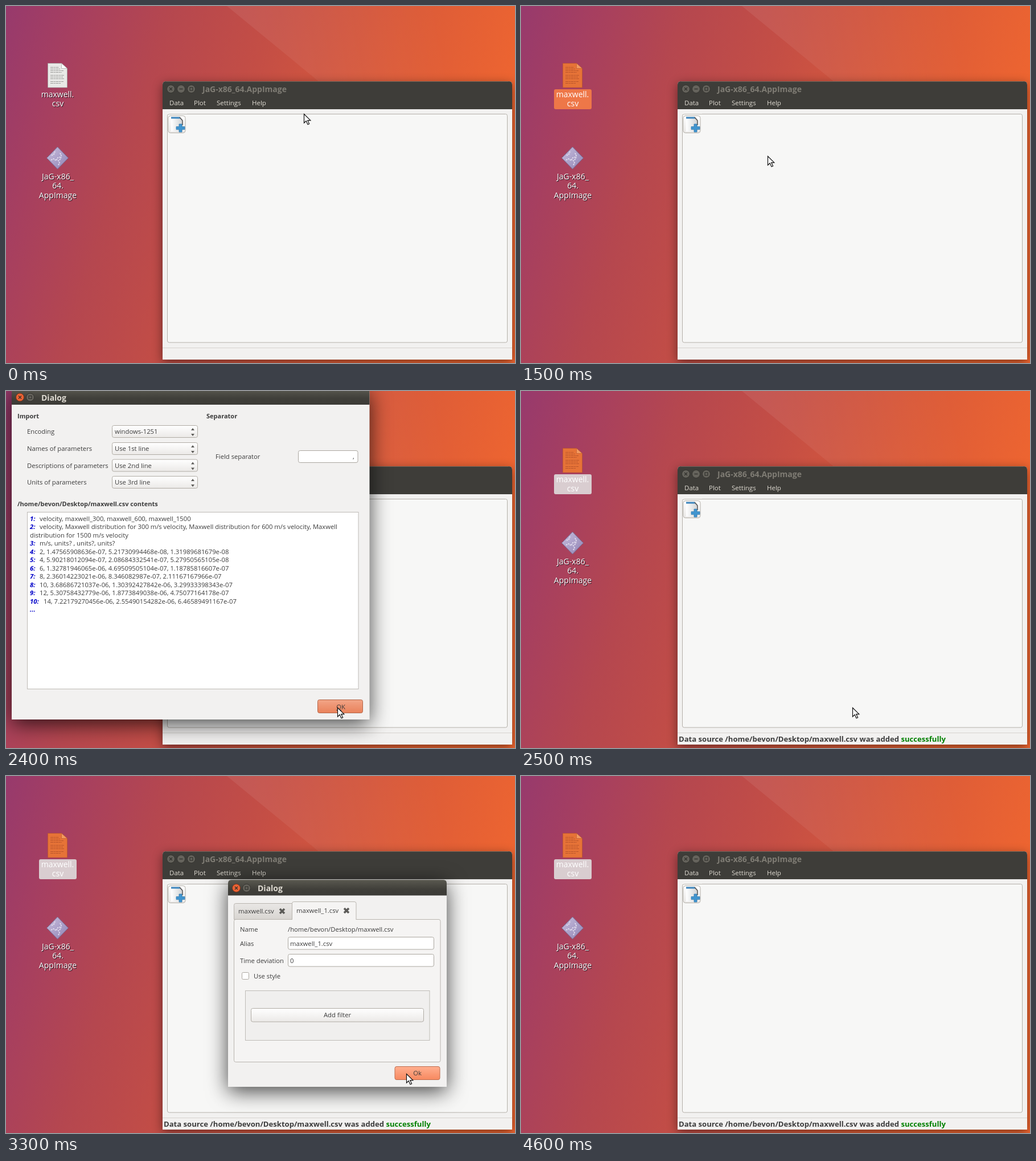
An HTML page for the animation above (4.8 s loop, 894 by 626 pixels).

```html
<!DOCTYPE html>
<html lang="en">
<head>
<meta charset="utf-8">
<title>Importing a CSV file</title>
<style>
html, body { margin: 0; width: 100%; height: 100%; overflow: hidden; }
svg { display: block; width: 894px; height: 626px; }
text { font: 11.25px "Open Sans", sans-serif; fill: #3c3c3c; white-space: pre; }
.bold { font-weight: 700; font-size: 11px; }
.title { font-weight: 700; font-size: 14px; fill: #dfdbd2; }
.menu { font-size: 11.5px; fill: #dfdbd2; }
.label { font-size: 14px; fill: #fff; text-anchor: middle; }
.shaded { filter: drop-shadow(1px 1px 0 #2a1420); }
.num { font-weight: 700; font-style: italic; fill: #0000c8; }
.status { font-weight: 700; font-size: 13.1px; }
.mid { text-anchor: middle; }
.field { fill: #fff; stroke: #aba7a0; }
.combo { fill: url(#button); stroke: #b0aca5; }
.frame { filter: drop-shadow(0 8px 18px #000b); }
#main .frame { filter: drop-shadow(0 5px 9px #0007); }
#main.active .frame { filter: drop-shadow(0 8px 18px #000b); }
#main:not(.active) .title { fill: #7f7c74; }
#main:not(.active) .bar { fill: #3e3d39; }
#main:not(.active) .close { fill: #65635c; stroke: #33322e; }
.ok rect { fill: url(#orange); stroke: #b9694b; }
.ok.hover rect { filter: brightness(1.03); }
.ok.down rect { filter: brightness(.97); }
.ok.down text { transform: translate(1px, 1px); }
.file { --page: #e9e9e7; --ink: #9a9a98; --fold: #fff; }
.file.hover { filter: brightness(1.12); }
.file.picked, #ghost { --page: #e67337; --ink: #b9542b; --fold: #f39a61; }
.plate { fill: none; }
.picked .plate, #ghost .plate { fill: #ee7748; }
.picked.dim .plate { fill: #d9cdd0; }
</style>
</head>
<body>
<svg id="stage" viewBox="0 0 894 626"></svg>
<script>
const text = (x, y, s, cls = '') => `<text x="${x}" y="${y}" class="${cls}">${s}</text>`;
const rect = (x, y, w, h, attrs = '') => `<rect x="${x}" y="${y}" width="${w}" height="${h}" ${attrs}/>`;
const path = (d, attrs = '') => `<path d="${d}" ${attrs}/>`;
const gradient = (id, line, ...stops) => `<linearGradient id="${id}" ${line}>` + stops.map(([at, color, alpha = 1]) =>
  `<stop offset="${at}" stop-color="${color}" stop-opacity="${alpha}"/>`).join('') + '</linearGradient>';
const down = 'x2="0" y2="1"';
const csvPath = '/home/bevon/Desktop/maxwell.csv';

// Dark rounded title bar, window buttons and light body
function windowFrame(x, y, w, h, barH, cy, titleX, title, hasMinimize) {
  const top = `M${x} ${y + barH}V${y + 6}q0 -6 6 -6H${x + w - 6}q6 0 6 6V${y + barH}z`;
  const cx = x + 14.5, mx = cx + (hasMinimize ? 36 : 18);
  const knob = (kx, cls) => `<circle cx="${kx}" cy="${cy}" r="7" fill="#65635c" stroke="#33322e" class="${cls}"/>`;
  return path(`M${x} ${y + 6}q0 -6 6 -6H${x + w - 6}q6 0 6 6V${y + h}H${x}z`, 'fill="#f2f1f0" class="frame"') +
    path(top, 'fill="url(#bar)" class="bar"') +
    path(`M${x + 6} ${y + .5}h${w - 12}`, 'stroke="#66645c"') +
    `<circle cx="${cx}" cy="${cy}" r="7" fill="#ec6334" stroke="#7d3119" class="close"/>` +
    path(`M${cx - 2.5} ${cy - 2.5}l5 5m0 -5l-5 5`, 'stroke="#33322e" stroke-width="1.4"') +
    (hasMinimize ? knob(cx + 18, '') + path(`M${cx + 15} ${cy}h6`, 'stroke="#33322e" stroke-width="1.4"') : '') +
    knob(mx, '') + rect(mx - 2.5, cy - 2.5, 5, 5, 'fill="none" stroke="#33322e" stroke-width="1.2"') +
    text(titleX, cy + 5.5, title, 'title');
}

const okButton = (id, x, y, w, s) => `<g id="${id}" class="ok">${rect(x + .5, y + .5, w, 23, 'rx="3"')}
  ${text(x + w / 2 + .5, y + 16, s, 'mid')}</g>`;

const combo = (y, label, value) => text(37, y + 15, label) +
  rect(186.5, y + .5, 150, 21, 'rx="3" class="combo"') + text(191, y + 15, value) +
  path(`M325 ${y + 9}l3 -4l3 4zM325 ${y + 15}l3 4l3 -4z`, 'fill="#5c5b58"');

const pageIcon = path('M73.5 100.5h24l10 9v33.5h-34z', 'fill="var(--page)" stroke="var(--ink)" stroke-width=".7"') +
  path('M97.5 100.5v9h10z', 'fill="var(--fold)" stroke="var(--ink)" stroke-width=".6"') +
  path('M78 107.5h15M78 110.5h17M78 113.5h23M78 116.5h20M78 121.5h24M78 124.5h22M78 127.5h24M78 132.5h23M78 135.5h18',
    'stroke="var(--ink)" stroke-dasharray="5 .7 3 .7"');
const fileLabel = rect(58, 146, 66, 35, 'rx="3" class="plate"') +
  text(90.5, 160, 'maxwell.', 'label') + text(91, 176, 'csv', 'label');

const wallpaper = rect(0, 0, 894, 626, 'fill="url(#sky)"') + path('M388 0H894V415z', 'fill="url(#facet)"');

const launcher = path('M90.5 247l19 19.5l-19 19.5l-19 -19.5z', 'fill="url(#lilac)" stroke="#75698f"') +
  path('M80 262l4 -2l2 -5M79 270l5 -2l4 3l3 -5l4 -1M92 279l2 -4l-2 -4l4 -3l1 -7l-3 -4',
    'fill="none" stroke="#e0daec" stroke-width="2" stroke-dasharray="2.5 1.2"') +
  `<g class="shaded">${text(91, 304, 'JaG-x86_', 'label')}${text(91, 320, '64.', 'label')}${text(91, 337, 'AppImage', 'label')}</g>`;

const mainWindow = windowFrame(275, 132, 614, 488, 49, 145.5, 345, 'JaG-x86_64.AppImage', true) +
  text(287, 173.5, 'Data', 'menu') + text(330, 173.5, 'Plot', 'menu') +
  text(370, 173.5, 'Settings', 'menu') + text(432, 173.5, 'Help', 'menu') +
  rect(283.5, 189.5, 597, 400.5, 'rx="3" fill="#f7f7f6" stroke="#b4b0a9"') +
  path('M284 188.5h34', 'stroke="#fff"') +
  rect(285, 192.5, 30, 30, 'rx="4" fill="url(#button)" stroke="#b4b0a9"') +
  path('M290 195h15l5 4v21h-20z', 'fill="url(#paper)"') + path('M290 194.5h15l2 3h-17z', 'fill="#3a83bb"') +
  path('M305 195l5 6v8', 'fill="none" stroke="#555" stroke-width="1.5"') +
  path('M304 207h5v4.500h5v5h-5v4.500h-5v-4.500h-5v-5h5z', 'fill="#4195cf" stroke="#2b74aa" stroke-width=".7"') +
  path('M275 599.5h614', 'stroke="#d6d3cf"') +
  `<g id="status"><text x="277" y="615" class="status">Data source ${csvPath} was added <tspan fill="#008000">successfully</tspan></text></g>`;

const csvLines = [
  'velocity, maxwell_300, maxwell_600, maxwell_1500',
  'velocity, Maxwell distribution for 300 m/s velocity, Maxwell distribution for 600 m/s velocity, Maxwell',
  'm/s, units? , units?, units?',
  '2, 1.47565908636e-07, 5.21730994468e-08, 1.31989681679e-08',
  '4, 5.90218012094e-07, 2.08684332541e-07, 5.27950565105e-08',
  '6, 1.32781946065e-06, 4.69509505104e-07, 1.18785816607e-07',
  '8, 2.36014223021e-06, 8.346082987e-07, 2.11167167966e-07',
  '10, 3.68686721037e-06, 1.30392427842e-06, 3.29933398343e-07',
  '12, 5.30758432779e-06, 1.8773849038e-06, 4.75077164178e-07',
  '14, 7.22179270456e-06, 2.55490154282e-06, 6.46589491167e-07'];
const lineY = row => 228 + row * 14.45;

const importDialog = windowFrame(10, -4, 628.5, 580, 28, 11, 62, 'Dialog') +
  text(20, 48, 'Import', 'bold') + text(352, 48, 'Separator', 'bold') +
  combo(60, 'Encoding', 'windows-1251') + combo(90, 'Names of parameters', 'Use 1st line') +
  combo(119.5, 'Descriptions of parameters', 'Use 2nd line') + combo(149, 'Units of parameters', 'Use 3rd line') +
  text(368, 119, 'Field separator') + rect(513.5, 104.5, 104.5, 21, 'rx="3" class="field"') + text(609, 119, ',') +
  text(20, 201.5, csvPath + ' contents', 'bold') +
  rect(37.5, 212.5, 581.5, 310, 'fill="#fff" stroke="#bdbab5"') +
  csvLines.map((s, i) => {
    const y = lineY(i < 2 ? i : i + 1);
    return text(42, y, `${i + 1}:`, 'num') + text(i < 9 ? 59 : 66, y, s);
  }).join('') +
  text(42, lineY(2), 'distribution for 1500 m/s velocity') + text(42, lineY(11), '...', 'num') +
  okButton('okImport', 547, 541, 79, '<tspan text-decoration="underline">O</tspan>K');

const cross = (x, y) => path(`M${x - 4} ${y - 4}l8 8m0 -8l-8 8`, 'stroke="#5b5a57" stroke-width="3.6"');
const sourceDialog = windowFrame(390, 182, 384, 363, 27.5, 196.5, 442, 'Dialog') +
  rect(400.5, 251.5, 362.5, 250, 'rx="3" fill="#f5f4f3" stroke="#b9b5af"') +
  path('M400.5 251.5v-25q0 -3 3 -3h99v28z', 'fill="url(#tab)" stroke="#b9b5af"') +
  path('M502.5 252v-28.500q0 -3 3 -3h106.500q3 0 3 3v28.500', 'fill="#f5f4f3" stroke="#b9b5af"') +
  text(408, 241, 'maxwell.csv') + cross(485, 237) + text(510, 240, 'maxwell_1.csv') + cross(598, 236) +
  text(411, 272.5, 'Name') + text(495, 272.5, csvPath) +
  text(411, 297.5, 'Alias') + rect(495.500, 282.5, 256, 21.500, 'rx="3" class="field"') + text(499, 297.5, 'maxwell_1.csv') +
  text(411, 327.5, 'Time deviation') + rect(495.500, 312.5, 256, 21.500, 'rx="3" class="field"') + text(499, 327.5, '0') +
  rect(414.5, 344.5, 12, 12, 'rx="2" class="field"') + text(435, 355, 'Use style') +
  rect(420.5, 376.500, 323.5, 87, 'fill="#f0efee" stroke="#bfbcb7"') +
  rect(430.5, 407.5, 303, 23.500, 'rx="3" class="combo"') + text(582, 423, 'Add filter', 'mid') +
  okButton('okSource', 682.5, 509, 79, 'Ok');

const ghost = rect(58, 100, 66.5, 81, 'fill="#8f3c5e"') + rect(61, 123, 13, 18, 'fill="#e67337"') + pageIcon + fileLabel;
const arrow = path('M.5 .5v15.500l3.700 -3.500l2.800 6.300l2.600 -1.200l-2.800 -6h5z', 'fill="#fff" stroke="#111" stroke-width="1.2"');
const fist = path('M11 12q-2 -4 2 -4q1 -3 3 -1.500q2 -2 4 0q4 -1 4 3v5q0 3 -3 3h-6q-2 0 -4 -5.500z', 'fill="#fff" stroke="#111" stroke-width="1.2"') +
  path('M14 10v2M17 8v3M20 8v3', 'stroke="#111"') +
  path('M24.500 10v8M20.500 14h8', 'stroke="#fff" stroke-width="4"') + path('M24.500 11v6M21.500 14h6', 'stroke="#111" stroke-width="1.6"');

const group = (id, content, cls = '') => `<g id="${id}" class="${cls}">${content}</g>`;
document.getElementById('stage').innerHTML = '<defs>' +
  gradient('sky', 'gradientUnits="userSpaceOnUse" x1="0" y1="20" x2="860" y2="280"',
    [0, '#983a6c'], [.13, '#a63f60'], [.3, '#b5474f'], [.5, '#c44e45'], [.75, '#db5b39'], [1, '#ee6530']) +
  gradient('facet', 'gradientUnits="userSpaceOnUse" x1="440" y1="60" x2="760" y2="0"', [0, '#fff', .07], [1, '#fff', 0]) +
  gradient('bar', down, [0, '#5a5950'], [.6, '#403f3a'], [1, '#3c3b37']) +
  gradient('button', down, [0, '#fff'], [1, '#ebe9e7']) +
  gradient('orange', down, [0, '#f9aa8b'], [1, '#f0855d']) +
  gradient('tab', down, [0, '#e9e7e5'], [1, '#d8d5d1']) +
  gradient('paper', 'x2="1" y2="0"', [0, '#fff'], [1, '#cfd2d4']) +
  gradient('lilac', 'x2="1" y2="1"', [0, '#c9bfde'], [1, '#8f82b4']) + '</defs>' +
  wallpaper + group('file', pageIcon + group('fileLabel', fileLabel), 'file') + launcher +
  group('main', mainWindow) + group('importDialog', importDialog) + group('sourceDialog', sourceDialog) +
  group('ghost', ghost) + group('arrow', arrow) + group('fist', fist);

const el = id => document.getElementById(id);
const show = (id, on) => { el(id).style.display = on ? '' : 'none'; };
const place = (id, x, y) => el(id).setAttribute('transform', `translate(${x} ${y})`);
const toggle = (id, classes) => Object.entries(classes).forEach(([name, on]) => el(id).classList.toggle(name, on));

// Pointer moves: first step, last step, destination, upward bow
const start = [523, 189];
const moves = [
  [100, 600, 92, 122, 0], [800, 1100, 433, 263, 0], [1800, 2300, 582, 555, 0],
  [2800, 3300, 703, 522, 46], [3900, 4400, 472, 1, 0]];

function pointerAt(t) {
  let [x, y] = start;
  for (const [from, to, toX, toY, bow] of moves) {
    if (t < from) break;
    const u = Math.min(1, (t - from + 100) / (to - from + 100));
    x += (toX - x) * u;
    y += (toY - y) * u - bow * Math.sin(Math.PI * u);
  }
  return [Math.round(x), Math.round(y)];
}

function render(now) {
  const t = Math.floor(now % 4800 / 100) * 100;
  const during = (from, to) => t >= from && t < to;
  const [x, y] = pointerAt(t), dragging = during(800, 1500);

  toggle('file', { hover: during(600, 800), picked: t >= 800, dim: t >= 1600 });
  toggle('fileLabel', { shaded: t < 800 });
  toggle('main', { active: during(3500, 4600) });
  toggle('okImport', { hover: t === 2300, down: t === 2400 });
  toggle('okSource', { hover: during(3100, 3400), down: t === 3400 });
  show('status', t >= 2500);
  show('importDialog', during(1600, 2500));
  show('sourceDialog', during(2600, 3500));
  show('ghost', dragging);
  show('fist', dragging);
  show('arrow', !dragging && t < 4500);
  place('ghost', x - 92, y - 122);
  place('fist', x, y);
  place('arrow', x, y);
  requestAnimationFrame(render);
}
requestAnimationFrame(render);
</script>
</body>
</html>
```
